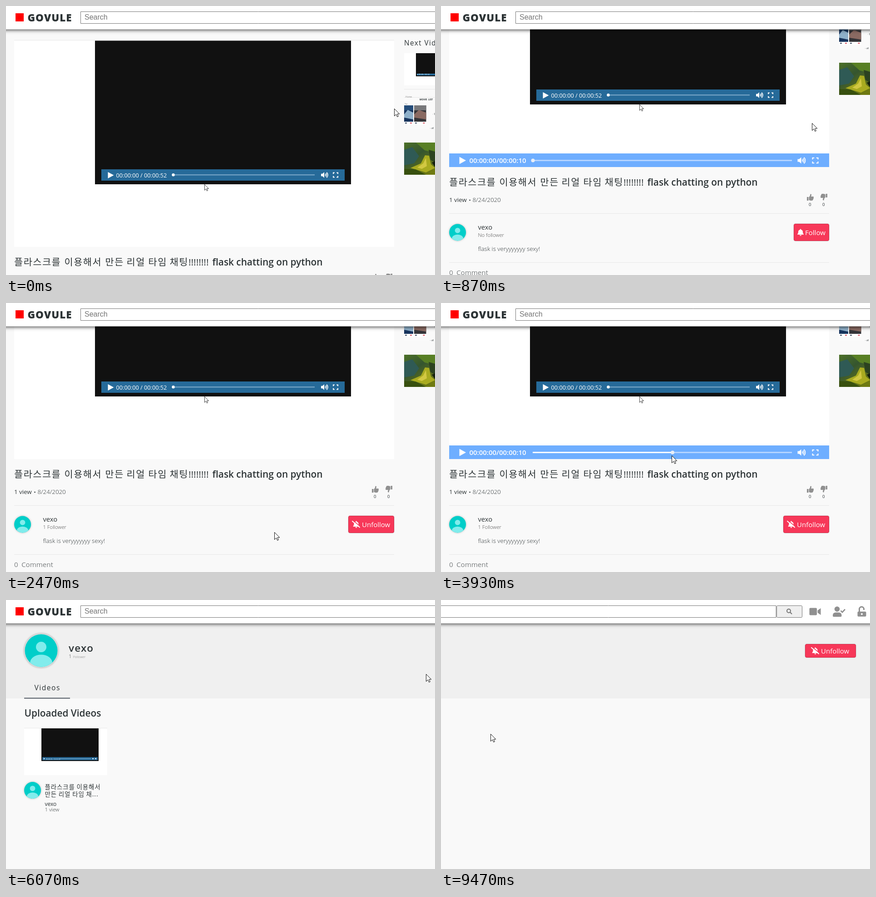
Animation, 945 px wide and 593 px high, one loop 9.67 s. Source, as an HTML page with a canvas:

```html
<!DOCTYPE html>
<html lang="ko">
<head>
<meta charset="utf-8">
<title>Video page</title>
<style>
html, body { margin: 0; width: 100%; height: 100%; overflow: hidden; background: #f9f9f9; }
canvas { display: block; }
</style>
</head>
<body>
<canvas id="stage" width="945" height="593"></canvas>
<script>
const ctx = document.getElementById('stage').getContext('2d');
const W = 945, H = 593, LOOP = 9670, FPS = 15;
const INK = '#2d3436', GRAY = '#909090', RED = '#f73859', RULE = '#e8e8e8';
const SANS = '"Open Sans", "Noto Sans CJK KR", sans-serif';
const KOREAN = '"Noto Sans CJK KR", "Noto Sans CJK", sans-serif';
const BRAND = 'GOVULE', OWNER = 'vexo';

// Keys are [step, ...values], linear in between.
const POINTER = [
  [0, 855, 226], [5, 817, 258], [17, 817, 258], [21, 833, 480], [23, 833, 480],
  [24, 779, 474], [36, 779, 474], [37, 591, 505], [40, 260, 511], [45, 72, 484],
  [50, 72, 484], [55, 430, 385], [59, 508, 336], [80, 508, 336], [83, 864, 157],
  [85, 864, 157], [91, 925, 163], [97, 938, 169], [123, 938, 169], [126, 480, 235],
  [129, 112, 297], [138, 112, 297], [139, 110, 296], [141, 110, 296], [142, 109, 295]
];
const SCROLL_Y = [[8, 0], [9, 12], [10, 52], [12, 142], [13, 176], [14, 187]];
const SCROLL_X = [[102, 0], [104, 40], [107, 139], [109, 260], [110, 299]];

const BELL = new Path2D('M7 0C8 0 8 .6 8 1.4C10.7 2 12 4 12 6.5C12 9.5 13 10.3 13.8 11.2Q14.2 12.4 13 12.4H1Q-.2 12.4 .2 11.2C1 10.3 2 9.5 2 6.5C2 4 3.3 2 6 1.4C6 .6 6 0 7 0ZM5 13.3H9A2 2 0 0 1 5 13.3Z');
const THUMB = new Path2D('M0 7H3.5V15H0ZM4.5 7.2C6.5 5.8 7 4 7.3 1.6C7.5 .1 10 .2 10 2.6C10 4 9.3 5 9.1 6H13.4C15.2 6 15.5 8 14.5 8.7C15.2 9.5 14.8 10.8 14 11.2C14.3 12.2 13.8 13 13.1 13.3C13.2 14.5 12.4 15 11 15H8.2C6.6 15 5.7 14 4.5 13.8Z');
const ARROW = new Path2D('M.5 .5V16.5L4.3 12.9L6.8 18.3L9.3 17.2L6.9 12H11.8Z');
const RESIZE = new Path2D('M.5 6L5 1.5V4H12V1.5L16.5 6L12 10.5V8H5V10.5Z');

function at(keys, n) {
  if (n <= keys[0][0]) return keys[0].slice(1);
  for (let i = 1; i < keys.length; i++) {
    const a = keys[i - 1], b = keys[i];
    if (n <= b[0]) {
      const k = (n - a[0]) / (b[0] - a[0]);
      return a.slice(1).map((v, j) => v + (b[j + 1] - v) * k);
    }
  }
  return keys[keys.length - 1].slice(1);
}

function rect(x, y, w, h, color) {
  ctx.fillStyle = color;
  ctx.fillRect(x, y, w, h);
}

function disc(x, y, r, color) {
  ctx.fillStyle = color;
  ctx.beginPath();
  ctx.arc(x, y, r, 0, 7);
  ctx.fill();
}

function poly(color, ...p) {
  ctx.fillStyle = color;
  ctx.beginPath();
  for (let i = 0; i < p.length; i += 2) ctx.lineTo(p[i], p[i + 1]);
  ctx.fill();
}

function box(x, y, w, h, r, fill, edge) {
  ctx.beginPath();
  ctx.roundRect(x + .5, y + .5, w - 1, h - 1, r);
  ctx.fillStyle = fill;
  ctx.fill();
  if (!edge) return;
  ctx.strokeStyle = edge;
  ctx.lineWidth = 1;
  ctx.stroke();
}

function text(s, x, y, size, { weight = 400, color = INK, gap = 0, family = SANS } = {}) {
  ctx.font = `${weight} ${size}px ${family}`;
  ctx.letterSpacing = gap + 'px';
  ctx.fillStyle = color;
  ctx.fillText(s, x, y);
}

function moved(x, y, draw, sx = 1, sy = sx) {
  ctx.save();
  ctx.translate(x, y);
  ctx.scale(sx, sy);
  draw();
  ctx.restore();
}

function icon(path, x, y, color, sx, sy) {
  moved(x, y, () => { ctx.fillStyle = color; ctx.fill(path); }, sx, sy);
}

function pointer(x, y, path = ARROW, scale = 1) {
  moved(x, y, () => {
    ctx.fillStyle = '#fff';
    ctx.fill(path);
    ctx.strokeStyle = '#111';
    ctx.lineWidth = 1;
    ctx.stroke(path);
  }, scale);
}

function avatar(x, y, r) {
  ctx.save();
  ctx.shadowColor = 'rgba(0,0,0,.25)';
  ctx.shadowBlur = 4;
  disc(x, y, r, '#00cec9');
  ctx.restore();
  ctx.save();
  ctx.beginPath();
  ctx.arc(x, y, r, 0, 7);
  ctx.clip();
  disc(x, y - r * .22, r * .32, '#81ecec');
  ctx.beginPath();
  ctx.ellipse(x, y + r * .74, r * .68, r * .49, 0, 0, 7);
  ctx.fill();
  ctx.restore();
}

function speaker(x, y, k) {
  moved(x, y, () => {
    poly('#fff', 0, -3, 3.5, -3, 8, -7, 8, 7, 3.5, 3, 0, 3);
    ctx.strokeStyle = '#fff';
    ctx.lineWidth = 1.8;
    for (const r of [3, 6, 9]) {
      ctx.beginPath();
      ctx.arc(8, 0, r, -.85, .85);
      ctx.stroke();
    }
  }, k);
}

function expand(x, y, w, h) {
  ctx.strokeStyle = '#fff';
  ctx.lineWidth = 2;
  for (const [sx, sy] of [[-1, -1], [1, -1], [1, 1], [-1, 1]]) {
    ctx.beginPath();
    ctx.moveTo(x + sx * w, y + sy * 2.2);
    ctx.lineTo(x + sx * w, y + sy * h);
    ctx.lineTo(x + sx * 2.2, y + sy * h);
    ctx.stroke();
  }
}

function followButton(x, y, w, h, on, hover) {
  ctx.save();
  ctx.shadowColor = 'rgba(0,0,0,.25)';
  ctx.shadowBlur = 3;
  box(x, y, w, h, 3, hover ? '#e83251' : RED);
  ctx.restore();
  box(x, y, w, h, 3, hover ? '#e83251' : RED, '#cf2a47');
  const mid = y + h / 2, right = x + w - (h > 32 ? 8 : 14);
  const label = on ? 'Unfollow' : 'Follow', left = right - (on ? 63 : 45);
  if (on) {
    icon(BELL, left - 19.5, mid - 7.5, '#fff');
    ctx.lineCap = 'round';
    for (const [c, d, lw] of [[RED, -1.6, 1.6], ['#fff', 0, 2]]) {
      ctx.strokeStyle = c;
      ctx.lineWidth = lw;
      ctx.beginPath();
      ctx.moveTo(left - 21 - d, mid - 7 + d);
      ctx.lineTo(left - 5 - d, mid + 6.5 + d);
      ctx.stroke();
    }
    ctx.lineCap = 'butt';
  } else {
    icon(BELL, left - 17, mid - 7.5, '#fff');
  }
  text(label, left, mid + 5.5, 15, { color: '#fff' });
}

function recording() {
  rect(18, 76, 837, 455, '#fff');
  rect(18, 75, 837, 1, RULE);
  rect(196, 76.5, 564, 316.5, '#111');
  rect(210, 360, 536, 25, '#266a99');
  poly('#fff', 224.5, 366, 237.5, 373, 224.5, 380);
  text('00:00:00 / 00:00:52', 242.5, 378, 12.7, { color: '#fff' });
  rect(368, 371, 312, 2.5, '#6f9fc2');
  disc(368.5, 372.3, 3.2, '#fff');
  speaker(694, 372.5, .88);
  expand(726, 372.5, 5, 5);
  pointer(437, 393, ARROW, .8);
}

function controls(seek) {
  rect(18, 501, 837, 30, '#6eaeff');
  poly('#fff', 40.5, 508.5, 55, 516.5, 40.5, 524.5);
  text('00:00:00/00:00:10', 62.5, 522, 15, { weight: 600, color: '#fff' });
  rect(202, 515, 571, 3, '#b4d4ff');
  if (seek) rect(202, 515, seek - 202, 3, '#fff');
  disc(seek || 202.5, 516.5, 4, '#e9eef6');
  speaker(785.5, 516.5, 1);
  expand(824.5, 516.5, 6, 5.7);
}

function forest(x, y) {
  ctx.save();
  ctx.beginPath();
  ctx.rect(x, y, 127, 71);
  ctx.clip();
  const g = ctx.createLinearGradient(x, y, x + 50, y + 71);
  g.addColorStop(0, '#4d7128');
  g.addColorStop(.45, '#35552f');
  g.addColorStop(1, '#6f7a12');
  rect(x, y, 127, 71, g);
  poly('#2f5a55', x, y + 16, x + 18, y + 10, x + 33, y + 30, x + 22, y + 46, x, y + 50);
  poly('#587f24', x + 26, y, x + 68, y, x + 68, y + 23, x + 45, y + 17);
  poly('#2c4220', x + 54, y + 16, x + 68, y + 20, x + 68, y + 44, x + 58, y + 38);
  poly('#a9ab20', x + 14, y + 56, x + 37, y + 46, x + 46, y + 28, x + 55, y + 29, x + 59, y + 48, x + 68, y + 56, x + 48, y + 66);
  poly('#d2c842', x + 29, y + 55, x + 42, y + 46, x + 48, y + 34, x + 50, y + 52, x + 39, y + 58);
  poly('#38500f', x, y + 58, x + 25, y + 59, x + 48, y + 71, x, y + 71);
  poly('#15200f', x + 61, y + 44, x + 68, y + 41, x + 68, y + 54);
  ctx.restore();
}

function poster(x, w, sky, mid, dark) {
  rect(x, 219, w, 36, dark);
  rect(x, 219, w, 11, sky);
  poly(mid, x, 239, x + w * .4, 229, x + w, 235, x + w, 250, x, 246);
  rect(x, 255, w, 7, '#fff');
  rect(x + 2, 257, 4, 2, '#36465c');
  rect(x + w - 7, 257, 4, 2, '#d54b58');
}

function sidebar() {
  text('Next Videos', 877, 87, 15.4, { gap: 1.4 });
  rect(877, 104, 127, 71, '#fff');
  rect(903, 104, 86, 51, '#111');
  rect(905, 149, 82, 4, '#266a99');
  text('▸ 00:00 / 00:52', 906, 152.3, 4, { color: '#fff' });
  rect(877, 183, 127, 1, RULE);
  rect(877, 200, 127, 71, '#fafafa');
  rect(877, 201, 127, .7, '#ddd');
  text('Home', 880, 201.5, 5, { color: '#888' });
  text('MOVIE  LIST', 911, 208, 5, { weight: 700 });
  text('Top', 878, 217, 4, { color: '#777' });
  poster(877, 20, '#244c79', '#8eb0ca', '#17345d');
  poster(899, 26.5, '#77777a', '#8a6a62', '#343438');
  text('· See', 940, 240, 5);
  text('- all', 934, 271, 5);
  forest(877, 301);
}

function title() {
  const words = [['플라스크를', 18], ['이용해서', 128.5], ['만든', 218.5], ['리얼', 265.5], ['타임', 313.5], ['채팅', 360.5]];
  for (const [s, x] of words) text(s, x, 572, 20.8, { weight: 500, gap: 1.5, family: KOREAN });
  text('!!!!!!!!', 402, 572, 20.8, { weight: 500 });
  text('flask chatting on python', 454.5, 572, 20.8, { weight: 600 });
}

function watchPage(n, y, cx, cy) {
  const followed = n >= 29, showBar = cx < 855 && cy + y < 531;
  moved(0, -y, () => {
    recording();
    if (showBar) controls(n >= 59 ? 510 : 0);
    sidebar();
    title();
    text('1 view', 18, 608, 13.3);
    disc(63.5, 604, 1.3, INK);
    text('8/24/2020', 69.5, 608, 13.3, { weight: 300 });
    icon(THUMB, 806, 590, GRAY);
    icon(THUMB, 851, 605, GRAY, -1);
    text('0', 810, 617, 9.5);
    text('0', 840, 617, 9.5);
    rect(18, 633, 837, 1, RULE);
    avatar(36.5, 675, 18.5);
    text(OWNER, 81.5, 669, 14.7, { weight: 500 });
    text(n >= 33 ? '1 Follower' : 'No follower', 81.5, 684.5, 11.2, { weight: 300, color: '#444' });
    text('flask is veryyyyyyy sexy!', 81.5, 716, 13.3, { weight: 300 });
    const w = followed ? 101 : 78;
    followButton(855 - w, 656, w, 38, followed, n >= 21 && n < 37);
    rect(18, 741, 837, 1, RULE);
    text('0', 18, 769, 15, { weight: 500, color: '#7b7f80' });
    text('Comment', 34, 769, 15.1, { weight: 500, color: '#7b7f80' });
  });
}

function channelPage(x) {
  rect(0, 52, W, 165, '#f0f0f0');
  moved(-x, 0, () => {
    ctx.save();
    ctx.shadowColor = 'rgba(0,0,0,.25)';
    ctx.shadowBlur = 4;
    disc(77.5, 111.5, 37.5, '#f4f4f4');
    ctx.restore();
    avatar(77.5, 111.5, 36);
    text(OWNER, 138, 114, 22.4, { weight: 600, gap: 1.3 });
    text('1', 138, 128, 11.2, { color: '#888' });
    text('Follower', 148, 127.5, 7.2, { weight: 300, color: '#777' });
    text('Videos', 62.5, 199, 15.6, { gap: 1.5 });
    rect(40, 215.5, 101, 2, '#515862');
    text('Uploaded Videos', 40.5, 257, 20.8, { weight: 600 });
    rect(40, 283, 183, 103, '#fff');
    rect(40, 282, 183, 1, RULE);
    rect(78, 283, 126, 72, '#111');
    rect(80, 346.5, 122, 6.5, '#266a99');
    poly('#fff', 83, 348, 86, 349.8, 83, 351.6);
    text('00:00:00 / 00:00:52', 88, 351.7, 3.6, { color: '#fff' });
    rect(117, 349.3, 70, 1, '#8eb4cf');
    rect(190, 348.8, 3, 2, '#fff');
    rect(196, 348.8, 3, 2, '#fff');
    avatar(58.5, 419.5, 18.5);
    const small = { gap: .9, family: KOREAN };
    text('플라스크를 이용해서', 85.5, 417, 13.4, small);
    text('만든 리얼 타임 채...', 85.5, 433, 13.4, small);
    text(OWNER, 85.5, 454, 12, {});
    text('1 view', 85.5, 466, 11.5, { weight: 300 });
    followButton(1101, 97, 112, 30, true, false);
  });
}

function headerIcons() {
  ctx.strokeStyle = '#757575';
  ctx.lineWidth = 2;
  ctx.beginPath();
  ctx.arc(1065, 24, 4, 0, 7);
  ctx.moveTo(1068, 27);
  ctx.lineTo(1072, 31);
  ctx.stroke();
  box(1110, 17, 17.5, 17, 2, GRAY);
  poly(GRAY, 1128.5, 23, 1135.5, 18, 1135.5, 33, 1128.5, 28);
  disc(1171.5, 20, 5.8, GRAY);
  ctx.beginPath();
  ctx.roundRect(1162, 27.5, 19.5, 9.5, [6, 6, 2, 2]);
  ctx.fill();
  ctx.strokeStyle = GRAY;
  ctx.lineWidth = 2.6;
  ctx.beginPath();
  ctx.moveTo(1179.5, 23.5);
  ctx.lineTo(1183, 27);
  ctx.lineTo(1189, 20.5);
  ctx.stroke();
  box(1216, 25, 20, 12, 2, GRAY);
  ctx.lineWidth = 3;
  ctx.beginPath();
  ctx.moveTo(1220.5, 26);
  ctx.lineTo(1220.5, 20);
  ctx.arc(1225.5, 20, 5, Math.PI, 0);
  ctx.lineTo(1230.5, 22);
  ctx.stroke();
  disc(1226, 31, 2, '#fff');
}

function header(x) {
  ctx.save();
  ctx.shadowColor = 'rgba(0,0,0,.75)';
  ctx.shadowBlur = 8;
  ctx.shadowOffsetY = 1;
  rect(-20, -20, W + 40, 71.5, '#fff');
  ctx.restore();
  moved(-x, 0, () => {
    rect(21, 16, 18, 18, '#f00');
    text(BRAND, 47.5, 33.5, 22.4, { weight: 800, gap: 1 });
    box(164, 12, 873.5, 27, 0, '#fff', '#767676');
    text('Search', 173, 30, 16, { color: '#757575', family: '"Liberation Sans", Arial, sans-serif' });
    box(1038, 12, 57, 27, 2, '#efefef', '#767676');
    headerIcons();
  });
}

function draw(t) {
  const n = Math.floor(t * FPS / 1000 + .06);
  const [cx, cy] = at(POINTER, n), [sy] = at(SCROLL_Y, n), [sx] = at(SCROLL_X, n);
  rect(0, 0, W, H, '#f9f9f9');
  if (n < 70) watchPage(n, sy, cx, cy);
  else channelPage(sx);
  header(sx);
  if (n >= 97 && n < 124) pointer(cx, cy, RESIZE);
  else pointer(cx, cy);
}

const start = performance.now();
function tick() {
  draw((performance.now() - start) % LOOP);
  requestAnimationFrame(tick);
}
tick();
</script>
</body>
</html>
```
